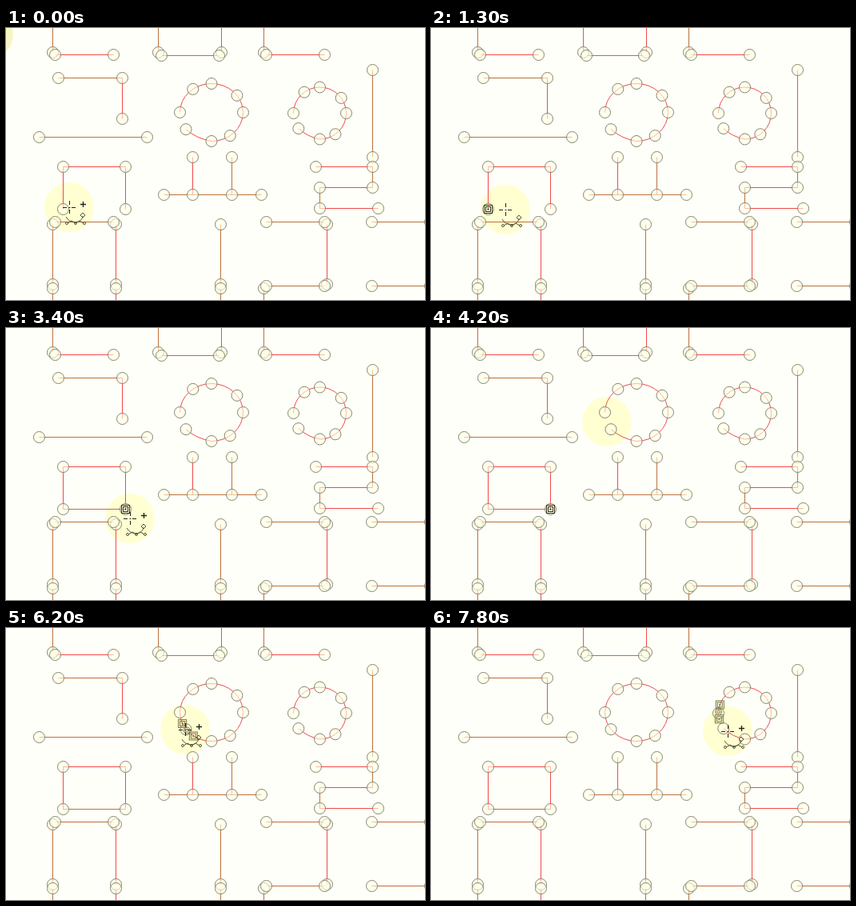
These frames come from a looping animation (524 px wide and 340 px high, 8 s). An HTML page:

```html
<!DOCTYPE html>
<html lang="en">
<head>
<meta charset="utf-8">
<title>Joining open outlines</title>
<style>
html, body { margin: 0; width: 100%; height: 100%; overflow: hidden; background: #fffffa; }
svg { display: block; width: 100vw; height: 100vh; }
</style>
</head>
<body>
<svg viewBox="0 0 524 340" fill="none">
  <rect width="524" height="340" fill="#fffffa"/>
  <circle id="corner" cx="-22" cy="8" r="31" fill="#f6f6c4"/>
  <circle id="halo" r="31" fill="#ffffd2"/>
  <g transform="translate(.5 .5)">
    <g id="lines"></g>
    <g id="nodes" fill="#ffffe6" fill-opacity=".6" stroke="#85856a"></g>
    <g id="marks"></g>
  </g>
  <g id="cursor" stroke="#222">
    <path d="M-8 .5H-3M3 .5H8M.5 -8V-3M.5 3V8M-.5 .5H1.5"/>
    <g stroke="#55553a">
      <path d="M-4 12Q0 19 8 19Q16 18 17 11M-2 20L3 17L8 20L13 17L18 20"/>
      <path d="M17 7L20 10L17 13L14 10Z"/>
      <circle cx="-3" cy="20" r="1.5"/><circle cx="8" cy="20" r="1.5"/><circle cx="19" cy="20" r="1.5"/>
    </g>
    <path id="plus" d="M14 -3.5H21M17.5 -7V0" stroke-width="1.3"/>
  </g>
</svg>
<script>
const LOOP = 8000, STEP = 100;
const RED = '#f04a4a', BROWN = '#bd7038', DARK = '#33331c', OLIVE = '#77773f';
const $ = id => document.getElementById(id);

function add(parent, tag, attrs) {
  const el = document.createElementNS('http://www.w3.org/2000/svg', tag);
  for (const k in attrs) el.setAttribute(k, attrs[k]);
  return parent.appendChild(el);
}
const stroke = (d, color) => add($('lines'), 'path', { d, stroke: color });
const node = ([cx, cy]) => add($('nodes'), 'circle', { cx, cy, r: 7 });

// Lines on even pixels look browner than those on odd ones
function segment([x0, y0], [x1, y1]) {
  const even = (x0 === x1 ? x0 : y0) % 2 === 0;
  return stroke(`M${x0} ${y0}L${x1} ${y1}`, even ? BROWN : RED);
}
function poly(...points) {
  points.forEach(node);
  points.slice(1).forEach((p, i) => segment(points[i], p));
}
const columns = (top, bottom, ...xs) => xs.forEach(x => poly([x, top], [x, bottom]));
const bars = (y, width, ...xs) => xs.forEach(x => poly([x, y], [x + width, y]));

columns(-20, 30, 58, 190, 269, 322);
columns(245, 320, 58, 137, 268, 401);
columns(325, 400, 58, 137, 268, 322);
columns(52, 161, 458);
columns(161, 208, 233, 282);
bars(33, 73, 61, 325);
bars(34, 72, 194);
bars(136, 135, 41);
bars(208, 122, 197);
bars(242, 73, 61, 325, 457);
bars(322, 73, 325, 457);
poly([65, 62], [145, 62], [145, 113]);
poly([71, 226], [71, 173], [149, 173], [149, 226]);
poly([387, 173], [458, 173], [458, 199], [392, 199], [392, 225], [465, 225]);
const side = segment([71, 226], [149, 226]);

function ring(cx, cy, rx, ry) {
  const at = deg => {
    const a = deg * Math.PI / 180;
    return [cx + rx * Math.cos(a), cy + ry * Math.sin(a)];
  };
  // The last span of an open ring bends less
  const arc = (from, to, large = 0, bend = 1) =>
    stroke(`M${at(from)}A${rx * bend} ${ry * bend} 0 ${large} 1 ${at(to)}`, RED);
  for (let deg = 0; deg < 360; deg += 90) {
    node(at(deg));
    node(at(deg + 54));
  }
  arc(180, 90, 1);
  return { at, open: arc(90, 144, 0, 1.6), closed: arc(90, 180) };
}
const rings = [ring(256.5, 105, 39.5, 36), ring(392, 106, 33, 32.5)];

function mark(from, to, color, ...points) {
  const g = add($('marks'), 'g', { stroke: color });
  for (const [x, y] of points) {
    for (const size of [10, 6, 1])
      add(g, 'rect', { x: x - size / 2, y: y - size / 2, width: size, height: size });
  }
  return { g, from, to };
}
function pair(from, to, { at }, deg) {
  const m = mark(from, to, OLIVE, at(deg - 16), at(deg + 16));
  const [x, y] = at(deg);
  for (const r of [2, 4]) add(m.g, 'circle', { cx: x, cy: y, r });
  return m;
}
const marks = [
  mark(900, 3000, DARK, [71, 226]),
  mark(3000, 5100, DARK, [149, 226]),
  pair(5100, 6100, rings[0], 183),
  pair(6100, 7200, rings[0], 141),
  pair(7300, LOOP, rings[1], 183)
];

// Pointer stops: arrival time, x, y
const REST = 200;
const stops = [
  [0, 79, 224], [800, 71, 226], [1300, 93, 227], [2200, 155, 222], [2900, 149, 227],
  [3400, 155, 238], [4200, 220, 117], [4500, 236, 112], [5000, 217, 106], [5400, 225, 131],
  [6000, 224, 127], [6900, 357, 107], [7800, 371, 129]
];
function position(t) {
  const i = Math.max(1, stops.findLastIndex(s => s[0] < t) + 1);
  const [t0, ...a] = stops[i - 1], [t1, ...b] = stops[i] ?? [LOOP, ...a];
  const k = Math.min(1, Math.max(0, (t - t0 - REST) / (t1 - t0 - REST) || 0));
  const e = k * k * (3 - 2 * k);
  return a.map((v, n) => Math.round(v + (b[n] - v) * e));
}

const within = (t, a, b) => t >= a && t < b;
const show = (el, on) => el.setAttribute('visibility', on ? 'inherit' : 'hidden');

function draw(now) {
  const t = Math.floor(now % LOOP / STEP) * STEP;
  const move = `translate(${position(t)})`;
  const joined = t >= 6100;
  $('halo').setAttribute('transform', move);
  $('cursor').setAttribute('transform', move);
  show($('corner'), t < 400);
  show($('cursor'), !within(t, 1700, 2600) && !within(t, 3700, 4500));
  show($('plus'), t < 800 || within(t, 3000, 4800) || joined);
  show(side, t >= 3000);
  show(rings[0].open, !joined);
  show(rings[0].closed, joined);
  show(rings[1].closed, false);
  for (const m of marks) show(m.g, within(t, m.from, m.to));
}

let start;
function tick(now) {
  start ??= now;
  draw(now - start);
  requestAnimationFrame(tick);
}
draw(0);
requestAnimationFrame(tick);
</script>
</body>
</html>
```
